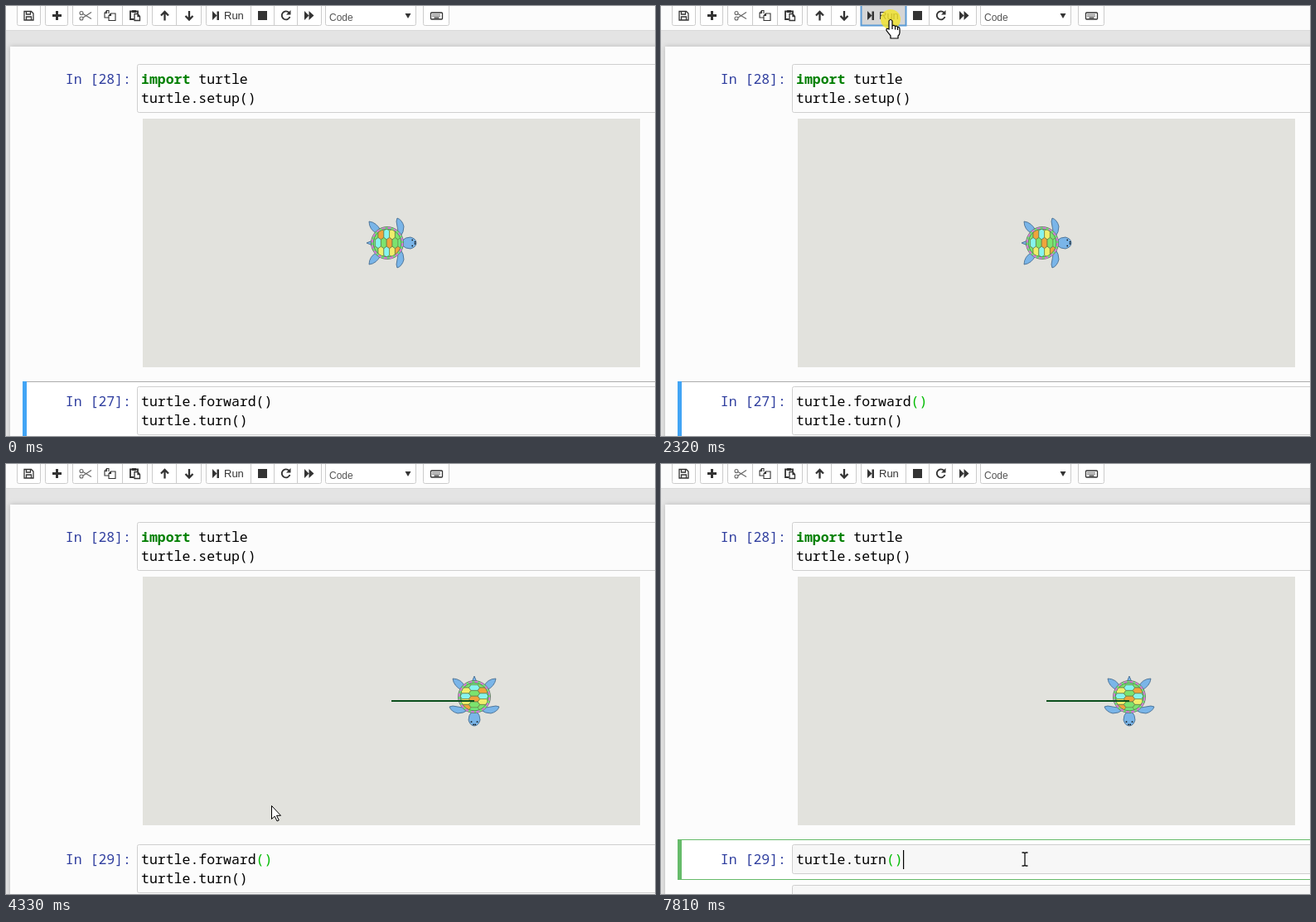
An HTML page for the animation above (8000 ms loop, 783 px wide and 519 px high).

```html
<!DOCTYPE html>
<html lang="en">
<head>
<meta charset="utf-8">
<title>Notebook turtle</title>
<style>
html, body { margin: 0; width: 100%; height: 100%; overflow: hidden; background: #e4e4e4; }
svg { display: block; }
text { font: 13px "Liberation Sans", Arial, sans-serif; fill: #333; white-space: pre; }
.code text { font: 16.5px "Noto Sans Mono", monospace; fill: #000; }
.code .prompt { fill: #303f9f; text-anchor: end; }
.code .kw { font-weight: bold; fill: #008000; }
.btn { fill: #fff; stroke: #ccc; }
.input { fill: #fcfcfc; stroke: #cfcfcf; }
.line { fill: none; stroke: #333; stroke-width: 1.3; }
.solid { fill: #333; }
.skin { fill: #7ab5e8; stroke: #3d6488; stroke-width: .8; }
</style>
</head>
<body>
<svg width="783" height="519" viewBox="0 0 783 519">
  <defs>
    <clipPath id="shell"><circle cx="-5" r="17"/></clipPath>
    <filter id="soft"><feGaussianBlur stdDeviation="3"/></filter>
  </defs>

  <rect width="783" height="519" fill="#e4e4e4"/>
  <rect x="5" y="49" width="800" height="500" fill="#b8b8b8" filter="url(#soft)"/>
  <rect x="5" y="49" width="778" height="470" fill="#fcfcfc"/>
  <rect width="783" height="29" fill="#fcfcfc"/>
  <path d="M0 29.5H783" stroke="#dadada"/>

  <!-- toolbar -->
  <g id="buttons"></g>
  <rect id="run" x="241.5" y="-5.5" width="54" height="29"/>
  <g class="line">
    <path d="M22 6.500h8.500l2.500 2.500v8h-11zM24.500 17v-4h6v4M24.500 6.500v3.500h5v-3.500"/>
    <path d="M61.500 6v11M56 11.500h11" stroke-width="3"/>
    <g stroke="#666" stroke-width="1.100">
      <path d="M93 9.500L103 15.500M93 14L103 7.500"/>
      <circle cx="91" cy="8.500" r="2"/><circle cx="91" cy="15" r="2"/>
    </g>
    <path d="M124 9V5.500h-2.500l-2.500 3v5.500h4.500M119 8.500h2.500v-3M126.500 9h5.500v8.500h-8v-6zM124 11.500h2.500v-2.500" stroke-width="1.100"/>
    <path d="M154.500 16h-4.500v-9.500h9v2.500" stroke-width="1.800"/>
    <path d="M155 9.500h4l2.500 3v5h-6.500zM159 9.500v3h2.500"/>
    <path d="M191.500 17.500V7.500M187 11.500l4.500-4.500 4.500 4.500M221 6v10M216.500 12l4.500 4.500 4.500-4.500" stroke-width="2.300"/>
    <path d="M341.500 8A5 5 0 1 0 342.500 13" stroke-width="1.900"/>
    <rect x="512.500" y="8" width="14" height="8" rx="1"/>
    <path d="M514.500 10.500h10M514.500 12.300h10" stroke-dasharray="1 1"/>
    <path d="M516.500 14.200h6"/>
  </g>
  <g class="solid">
    <path d="M152 5h5v3h-5z"/>
    <path d="M249 6l5.500 5.500-5.500 5.500zM254.500 6.500h2.500v10.500h-2.500z"/>
    <path d="M304 6h11v11h-11z"/>
    <path d="M343.500 5v5.500h-5.500z"/>
    <path d="M360 6l5.500 5.500-5.500 5.500zM365.500 6l6 5.500-6 5.500z"/>
    <path d="M481.500 9h7l-3.500 6z"/>
  </g>
  <text x="263" y="16">Run</text>
  <text x="390" y="18" style="font-size:12px;fill:#555">Code</text>

  <!-- first cell -->
  <rect class="input" x="158.500" y="70.500" width="640" height="58" rx="2"/>
  <rect x="165" y="136" width="600" height="300" fill="#e2e2dd"/>
  <g class="code">
    <text class="prompt" x="151" y="94">In [28]:</text>
    <text x="163" y="94"><tspan class="kw">import</tspan> turtle</text>
    <text x="163" y="117">turtle.setup()</text>
  </g>

  <!-- turtle -->
  <g id="turtle">
    <g class="skin">
      <path id="flipper" d="M7-30Q13-28 15-20Q15-13 11-8L6-11Q9-16 7-20Q5-27 7-30Z"/>
      <path id="leg" d="M-27-26Q-18-25-13-15L-17-11Q-27-16-27-26Z"/>
      <use href="#flipper" transform="scale(1 -1)"/>
      <use href="#leg" transform="scale(1 -1)"/>
      <path d="M-30 0l6-2.500v5z"/>
      <path d="M13-3Q17-7 23-7Q30-5 30 0Q30 5 23 7Q17 7 13 3Z"/>
    </g>
    <path d="M24.500-3.500h2M24.500 3.500h2M28.500-2v4" stroke="#111" stroke-width="1.600" stroke-dasharray="1.500 .7"/>
    <circle cx="-5" r="19.500" fill="#72e67a" stroke="#5b6b5b" stroke-width=".8"/>
    <circle cx="-5" r="18.200" fill="none" stroke="#d678d8" stroke-width="2.200" stroke-dasharray="4 3.150"/>
    <g id="scutes" clip-path="url(#shell)" stroke="#6b7a45" stroke-width=".7"></g>
    <circle cx="-5" r="16.800" fill="none" stroke="#4f7d50" stroke-width=".8"/>
  </g>
  <path id="trail" stroke="#0b4f1c" stroke-width="2"/>

  <!-- second cell -->
  <g id="cell">
    <rect id="frame" x="20.500" y="453.500" width="800" fill="#fff"/>
    <rect id="bar" x="20" y="453" width="5"/>
  </g>
  <rect id="input" class="input" x="158.500" y="459.500" width="640" rx="2"/>
  <rect id="next" x="158.500" y="508.500" width="640" height="40" rx="2" fill="#f7f7f7" stroke="#cfcfcf"/>
  <rect id="selection" x="163" y="466" width="158.500" height="23" fill="#d7d4f0"/>
  <g class="code">
    <text id="prompt" class="prompt" x="151" y="483"></text>
    <text id="forward" x="163" y="483">turtle.forward<tspan class="paren">()</tspan></text>
    <text id="turn" x="163">turtle.turn<tspan class="paren">()</tspan></text>
  </g>
  <rect id="caret" y="466" width="1.200" height="23"/>

  <g id="tip">
    <rect x="286.500" y="34.500" width="35" height="19" fill="#fff" stroke="#bbb"/>
    <text x="293" y="48" style="font-size:12px;fill:#575757">Run</text>
  </g>

  <!-- pointer -->
  <g id="pointer">
    <circle id="glow" r="12" fill="#f2e327" opacity=".8"/>
    <path id="arrow" d="M.5.5V16.500l3.700-3.300 2.800 5.800 2.300-1-2.800-5.700h5z" fill="#fff" stroke="#000"/>
    <path id="beam" d="M-3.500-8H-1L0-7L1-8H3.500M0-7V7M-3.500 8H-1L0 7L1 8H3.500" fill="none" stroke="#111" stroke-width="1.300"/>
    <path id="hand" d="M-2 2Q0-1 2 2V8Q4 6.500 5.500 8.500Q7.500 7.500 8.500 9.500Q11 9 11 12V16Q11 19 9 20V23H0V20L-5 13.500Q-5.500 10-2 12ZM2 8v4M5.500 8.500v4M8.500 9.500v3.500" fill="#fff" stroke="#000" stroke-width="1.200"/>
  </g>
</svg>
<script>
const LOOP = 8000;
const el = {};
document.querySelectorAll('[id]').forEach(e => el[e.id] = e);
const parens = document.querySelectorAll('.paren');
const set = (e, attrs) => { for (const k in attrs) e.setAttribute(k, attrs[k]); };
const show = (e, on) => e.style.display = on ? '' : 'none';
const within = (t, a, b) => t >= a && t < b;

// Toolbar boxes: left edge, width, inner dividers
const boxes = [[13, 29], [47, 28], [80, 91, 111, 141], [176, 60, 206],
  [241, 140, 296, 324, 352], [385, 110], [503, 32]];
el.buttons.innerHTML = boxes.map(([x, w, ...cuts]) =>
  `<rect class="btn" x="${x + .5}" y="-5.5" width="${w - 1}" height="29" rx="2"/>` +
  cuts.map(c => `<path d="M${c - .5} 0V23" stroke="#ccc"/>`).join('')).join('');

const hex = (x, y, color) =>
  `<path d="M${x - 3.4} ${y - 4}l3.400-2.500 3.400 2.500v8l-3.400 2.500-3.400-2.500z" fill="${color}"/>`;
const green = '#7be36e', cyan = '#86f4ee', orange = '#f0a43c', yellow = '#f0ee6c';
const row = (x, y, colors) => colors.map((c, i) => hex(x + i * 6.8, y, c)).join('');
el.scutes.innerHTML = row(-19.4, -10.6, [green, orange, cyan, yellow, green]) +
  row(-19.4, 10.6, [green, yellow, cyan, yellow, orange]) +
  row(-16, 0, [cyan, green, orange, green]);

// Progress in n equal jumps; the first lands at a, the last at b
function steps(t, a, b, n) {
  if (t < a) return 0;
  return Math.min(n, Math.floor((t - a) / (b - a) * (n - 1) + .2) + 1) / n;
}
const ease = p => Math.sin(p * Math.PI / 2) ** 2;
const settle = p => 1 - (1 - p) ** 2.6;

// Pointer moves: begin, end, jumps, x, y
const moves = [
  [250, 780, 8, 456, 480],
  [1080, 1081, 1, 448, 472],
  [1157, 1620, 7, 277, 16],
  [3950, 4490, 8, 327, 480],
  [4720, 4721, 1, 333, 483],
  [4950, 5100, 3, 439, 477]
];

function drawPointer(t) {
  let x = 500, y = 521;
  for (const [a, b, n, toX, toY] of moves) {
    const p = ease(steps(t, a, b, n));
    x += (toX - x) * p;
    y += (toY - y) * p;
  }
  const onBar = y < 25 && within(x, 241, 381), onCode = y > 459;
  set(el.pointer, { transform: `translate(${Math.round(x)} ${Math.round(y)})` });
  show(el.pointer, t >= 250);
  show(el.hand, onBar);
  show(el.beam, onCode);
  show(el.arrow, !onBar && !onCode);
  show(el.glow, within(t, 780, 850) || within(t, 2250, 2400) || within(t, 4870, 5020));

  const pressed = within(t, 2250, 2400);
  show(el.run, onBar && x < 296);
  set(el.run, {
    fill: pressed ? '#d6d6d6' : '#e2e2e2',
    stroke: pressed ? '#5b9bd5' : '#adadad',
    'stroke-width': pressed ? 2 : 1
  });
  show(el.tip, within(t, 2080, 2250));
}

function drawTurtle(t) {
  const x = 465 + 100 * settle(steps(t, 2480, 2630, 3));
  const angle = 90 * settle(steps(t, 2950, 3090, 3));
  set(el.turtle, { transform: `translate(${x} 286) rotate(${angle})` });
  set(el.trail, { d: `M465 286H${x}` });
}

function drawCell(t) {
  const editing = within(t, 780, 2250) || t >= 4870;
  const joined = t >= 7580;
  const color = editing ? '#66bb6a' : '#42a5f5';
  show(el.cell, t < 2400 || t >= 4870);
  set(el.frame, { height: joined ? 48 : 71, stroke: editing ? color : '#ababab' });
  set(el.bar, { height: joined ? 49 : 72, fill: color });
  set(el.input, { height: joined ? 35 : 58 });
  el.input.style.fill = editing ? '#f7f7f7' : '#fcfcfc';
  show(el.next, joined);

  el.prompt.textContent = `In [${t < 2400 ? 27 : t < 3320 ? '*' : 29}]:`;
  show(el.forward, t < 6970);
  set(el.turn, { y: joined ? 483 : 506 });
  parens[0].style.fill = within(t, 780, 6260) ? '#0b0' : '#000';
  parens[1].style.fill = t >= 7810 ? '#0b0' : '#000';
  show(el.selection, within(t, 6260, 6970));

  show(el.caret, within(t, 780, 1320) || within(t, 1850, 2250) || within(t, 4870, 5410) ||
    within(t, 5960, 6260) || within(t, 6970, 7500) || joined);
  set(el.caret, { x: t < 6260 ? 321 : t < 7810 ? 163 : 292 });
}

function frame() {
  const t = performance.now() % LOOP;
  drawTurtle(t);
  drawCell(t);
  drawPointer(t);
  requestAnimationFrame(frame);
}
frame();
</script>
</body>
</html>
```
